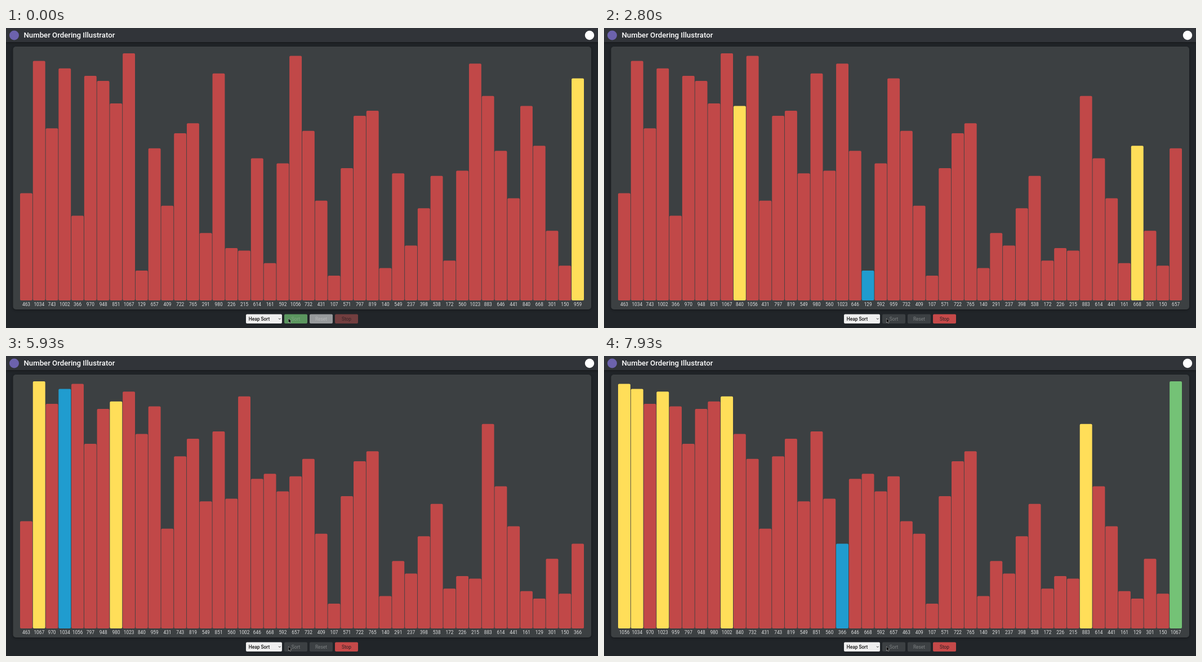
An HTML page with a canvas that plays this animation: 1051x533 px, repeating every 8000 ms.

```html
<!DOCTYPE html>
<html lang="en">
<head>
<meta charset="utf-8">
<title>Number Ordering Illustrator</title>
<style>
  html, body { margin: 0; width: 100%; height: 100%; overflow: hidden; background: #212529; }
  canvas { display: block; }
</style>
</head>
<body>
<canvas id="stage" width="1051" height="533"></canvas>
<script>
const ctx = document.getElementById('stage').getContext('2d');
const LOOP = 8000;
const COMPARE = 101.6, SWAP = 8;
const RED = '#c14848', YELLOW = '#ffde59', BLUE = '#209ccf', GREEN = '#74c276';
const FONT = 'Roboto, Arial, sans-serif';

const START = [
  463, 1034, 743, 1002, 366, 970, 948, 851, 1067, 129, 657, 409, 722, 765, 291,
  980, 226, 215, 614, 161, 592, 1056, 732, 431, 107, 571, 797, 819, 140, 549,
  237, 398, 538, 172, 560, 1023, 883, 646, 441, 840, 668, 301, 150, 959
];

// Runs heap sort once and records the bars after every visible step.
function record() {
  const vals = [...START];
  const marks = vals.map(() => RED);
  const steps = [];
  let time = 38.5 - COMPARE;

  const hold = ms => {
    steps.push({ time, vals: [...vals], marks: [...marks] });
    time += ms;
  };
  const swap = (a, b) => {
    [vals[a], vals[b]] = [vals[b], vals[a]];
    hold(SWAP);
  };

  function heapify(size, root) {
    const kids = [2 * root + 1, 2 * root + 2].filter(k => k < size);
    let largest = root;
    kids.forEach((kid, n) => {
      if (n) marks[kids[n - 1]] = RED;
      marks[kid] = YELLOW;
      hold(COMPARE);
      if (vals[kid] > vals[largest]) largest = kid;
    });
    if (largest !== root) swap(root, largest);
    kids.forEach(kid => { marks[kid] = RED; });
    if (largest === root) return;
    marks[root] = YELLOW;
    marks[largest] = BLUE;
    heapify(size, largest);
    marks[root] = marks[largest] = RED;
  }

  for (let i = vals.length / 2 - 1; i >= 0; i--) heapify(vals.length, i);
  for (let end = vals.length - 1; end > 0 && time < LOOP; end--) {
    swap(0, end);
    marks[end] = GREEN;
    heapify(end, 0);
  }
  return steps;
}

const steps = record();

function box(x, y, w, h, r, fill) {
  ctx.fillStyle = fill;
  ctx.beginPath();
  ctx.roundRect(x, y, w, h, r);
  ctx.fill();
}

function disc(x, y, r, fill) {
  ctx.fillStyle = fill;
  ctx.beginPath();
  ctx.arc(x, y, r, 0, Math.PI * 2);
  ctx.fill();
}

function label(text, x, y, size, fill, align = 'center', weight = 400) {
  ctx.font = `${weight} ${size}px ${FONT}`;
  ctx.textAlign = align;
  ctx.fillStyle = fill;
  ctx.fillText(text, x, y);
}

function shadow(color, blur, y) {
  ctx.shadowColor = color;
  ctx.shadowBlur = blur;
  ctx.shadowOffsetY = y;
}

function mix(from, to, p) {
  return `rgb(${from.map((c, i) => Math.round(c + (to[i] - c) * p))})`;
}

function drawPage() {
  ctx.fillStyle = '#212529';
  ctx.fillRect(0, 0, 1051, 533);
  shadow('rgba(0,0,0,0.4)', 4, 1);
  box(0, 0, 1051, 25, 0, '#313439');
  box(12.5, 33, 1026.5, 467, 5, '#3c4042');
  shadow('transparent', 0, 0);
  disc(14.5, 13, 8.5, '#6c62ad');
  label('Number Ordering Illustrator', 31.5, 17, 13.2, '#ffffff', 'left', 500);
  disc(1036, 13, 8.2, '#ffffff');
}

function drawBars({ vals, marks }) {
  vals.forEach((v, i) => {
    const x = 25 + i * 22.77;
    const h = v * 0.4114;
    box(x, 484 - h, 21.9, h, 2, marks[i]);
    label(v, x + 11, 494, 8.3, '#dedfe0');
  });
}

function button(text, x, bg, fg) {
  box(x, 508.5, 41, 16.5, 2, bg);
  label(text, x + 20.5, 519.6, 8.4, fg);
}

function drawControls(t) {
  const p = Math.min(t / 130, 1);
  const off = [60, 64, 67], dim = [125, 128, 130];
  box(426, 508.5, 64, 16.5, 2, '#efefef');
  label('Heap Sort', 430.7, 519.6, 8.4, '#111111', 'left', 500);
  ctx.strokeStyle = '#222222';
  ctx.lineWidth = 1;
  ctx.beginPath();
  ctx.moveTo(484, 515.8);
  ctx.lineTo(485.8, 517.6);
  ctx.lineTo(487.6, 515.8);
  ctx.stroke();

  button('Sort', 494, mix([91, 151, 95], off, p), mix([128, 166, 131], dim, p));
  button('Reset', 539, mix([152, 155, 157], off, p), mix([181, 183, 184], dim, p));
  button('Stop', 584, mix([113, 62, 63], [198, 73, 73], p), mix([55, 36, 38], [43, 34, 36], p));
}

function drawCursor() {
  ctx.beginPath();
  [[501.5, 516.3], [501.5, 523.3], [503.1, 521.8], [504.3, 524.3],
   [505.4, 523.8], [504.3, 521.4], [506.4, 521.2]].forEach(p => ctx.lineTo(...p));
  ctx.closePath();
  ctx.lineWidth = 1;
  ctx.strokeStyle = '#d8d8d8';
  ctx.stroke();
  ctx.fillStyle = '#000000';
  ctx.fill();
}

const origin = performance.now();

function draw() {
  const t = Math.max(0, performance.now() - origin) % LOOP;
  drawPage();
  drawBars(steps.findLast(s => s.time <= t));
  drawControls(t);
  drawCursor();
  requestAnimationFrame(draw);
}

draw();
</script>
</body>
</html>
```
